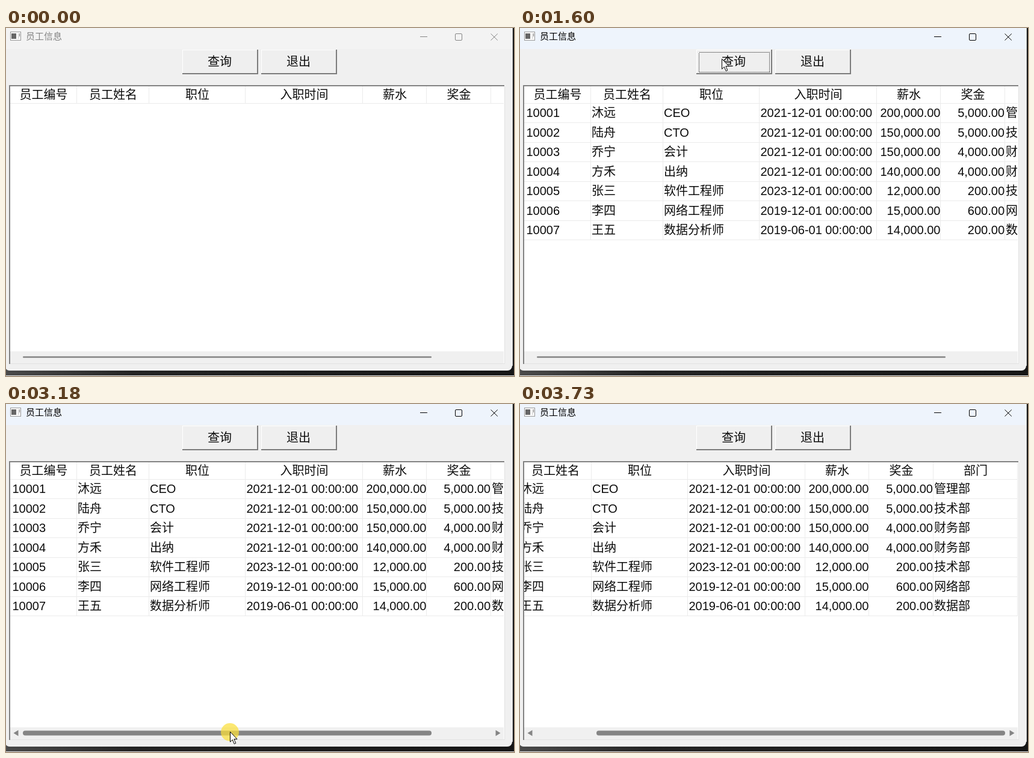
Animation, 844 px wide and 579 px high, one loop 3800 ms. Source, as an HTML page:

```html
<!DOCTYPE html>
<html lang="zh-CN">
<head>
<meta charset="utf-8">
<title>员工信息</title>
<style>
  html, body { margin: 0; width: 100%; height: 100%; overflow: hidden; background: #202020; }
  svg { display: block; width: 844px; height: 579px; }
  text { font: 300 20px "Liberation Sans", "Noto Sans CJK SC", "Noto Sans CJK", sans-serif; fill: #0c0c0c; }
  .mid { text-anchor: middle; }
  .end { text-anchor: end; }
  .caption { font-size: 15px; font-weight: 400; }
  .grid { fill: none; stroke: #ebebeb; }
  .crisp { shape-rendering: crispEdges; }
</style>
</head>
<body>
<svg viewBox="0 0 844 579">
  <defs>
    <linearGradient id="desk">
      <stop offset="0" stop-color="#4a4a4a"/>
      <stop offset=".25" stop-color="#242424"/>
      <stop offset="1" stop-color="#161616"/>
    </linearGradient>
    <clipPath id="view"><rect x="7" y="97" width="820" height="441"/></clipPath>
  </defs>

  <rect width="844" height="579" fill="url(#desk)"/>
  <rect y="578" width="844" height="1" fill="#e6e6e6"/>
  <path d="M0 0H841V562a8 8 0 0 1-8 8H6q-4 0-6-3Z" fill="#f0f0f0"/>
  <path d="M841.5 0V562" stroke="#d4d4d4"/>
  <rect id="bar" width="841" height="35"/>

  <g class="crisp">
    <rect x="7.5" y="6.5" width="17" height="14" fill="#fafafa" stroke="#9a9a9a"/>
    <rect x="9" y="9" width="8" height="9" fill="#666"/>
    <path d="M20.5 9V18" stroke="#ccc"/>
    <path d="M22.5 9V14" stroke="#777"/>
  </g>
  <text id="caption" class="caption" x="33" y="19.3">员工信息</text>
  <g id="controls" fill="none">
    <path d="M688 14.5H700M805.5 9.5 816.8 20.5M816.8 9.5 805.5 20.5"/>
    <rect x="746.5" y="9.5" width="11" height="11" rx="1.5"/>
  </g>

  <g id="buttons"></g>
  <rect id="focus" class="crisp" x="297.5" y="40.5" width="117" height="33" fill="none" stroke="#222" stroke-dasharray="1 1"/>

  <g class="crisp">
    <rect x="5" y="95" width="824" height="464" fill="#fff"/>
    <path d="M5 559V95H828V97H7V559Z" fill="#828282"/>
    <path d="M7 558.5H828.5V97" fill="none" stroke="#e2e2e2"/>
    <rect x="7" y="538" width="820" height="20" fill="#f0f0f0"/>
  </g>
  <g clip-path="url(#view)"><g id="table">
    <g id="head"></g>
    <g id="rows"></g>
  </g></g>

  <path id="arrows" d="M12.5 547.5 20.5 542.5V552.5ZM821.5 547.5 813.5 542.5V552.5Z" fill="#858585"/>
  <rect id="thumb" width="679" fill="#858585"/>

  <g id="pointer">
    <circle id="press" cy="1" r="15" fill="#fbdf3c" fill-opacity=".72"/>
    <path d="M.5.5V17.2L4.3 13.6 7.2 20.5 9.8 19.4 6.9 12.6H12Z" fill="#fff" stroke="#000"/>
  </g>
</svg>
<script>
const LOOP = 3800;
const $ = id => document.getElementById(id);
const set = (id, attrs) => { for (const k in attrs) $(id).setAttribute(k, attrs[k]); };
const show = (id, on) => set(id, { visibility: on ? 'visible' : 'hidden' });
const label = (x, y, s, cls = '') => `<text x="${x}" y="${y}" class="${cls}">${s}</text>`;

// Static parts
const button = (x, s) => `<g class="crisp">
  <rect x="${x}" y="36" width="126" height="41" fill="#7c7c7c"/>
  <rect x="${x}" y="36" width="124" height="39" fill="#fff"/>
  <rect x="${x + 1}" y="37" width="123" height="38" fill="#efefef"/></g>` + label(x + 62, 63.3, s, 'mid');
$('buttons').innerHTML = button(293, '查询') + button(424, '退出');

const edges = [7, 118, 238, 398, 593, 699, 806, 946];
const heads = ['员工编号', '员工姓名', '职位', '入职时间', '薪水', '奖金', '部门'];
const staff = [
  ['沐远', 'CEO', '2021-12', '200,000', '5,000', '管理部'],
  ['陆舟', 'CTO', '2021-12', '150,000', '5,000', '技术部'],
  ['乔宁', '会计', '2021-12', '150,000', '4,000', '财务部'],
  ['方禾', '出纳', '2021-12', '140,000', '4,000', '财务部'],
  ['张三', '软件工程师', '2023-12', '12,000', '200', '技术部'],
  ['李四', '网络工程师', '2019-12', '15,000', '600', '网络部'],
  ['王五', '数据分析师', '2019-06', '14,000', '200', '数据部']
];
const lines = (y1, y2) => edges.slice(1).map(x => `M${x - .5} ${y1}V${y2}`).join('');

$('head').innerHTML = `<path class="grid" d="M7 125.5H946${lines(97, 126)}"/>` +
  heads.map((s, i) => label((edges[i] + edges[i + 1]) / 2, 118.2, s, 'mid')).join('');

const row = ([name, job, month, pay, bonus, dept], i) => {
  const y = 148 + i * 32.5;
  return `<path class="grid" d="M7 ${Math.round(158 + i * 32.5) - .5}H946"/>` +
    label(10.5, y, 10001 + i) + label(119, y, name) + label(239, y, job) +
    label(399.5, y, month + '-01 00:00:00') + label(698.5, y, pay + '.00', 'end') +
    label(805, y, bonus + '.00', 'end') + label(807, y, dept);
};
$('rows').innerHTML = `<path class="grid" d="${lines(126, 353)}"/>` + staff.map(row).join('');

// Pointer: evenly timed poses [x, y, scrollbar width 0..1] per stretch
const glide = (n, a, b, ease) => Array.from({ length: n }, (_, i) => {
  const u = ease(i / (n - 1));
  return [a[0] + (b[0] - a[0]) * u, a[1] + (b[1] - a[1]) * u];
});
const easeOut = u => 1 - (1 - u) ** 2;
const smooth = u => u * u * (3 - 2 * u);
const runs = [
  [330, 800, [[600, 561, .1], [582, 524, .4], [520, 436, .55], [450, 342, .5],
              [387, 260, .4], [330, 176, .25], [321, 157, .15], [318, 116, .1]]],
  [870, 1210, glide(6, [321, 102], [335, 51], easeOut)],
  [1810, 2230, [[340, 54], [352, 61], [366, 71], [381, 81], [393, 88], [400, 84], [402, 76]]],
  [2370, 2840, glide(8, [401, 86], [339, 530], smooth)],
  [2910, 3050, [[346, 537], [360, 542, .5], [372, 545, 1]]],
  [3180, 3310, [[372, 545, 1], [408, 546, 1]]],
  [3380, 3730, [[607, 544, 1], [628, 549, 1], [656, 554, 1], [688, 561, 1], [716, 571, 1], [740, 600, 1]]]
];
const steps = runs.flatMap(([from, to, poses]) => poses.map(([x, y, h = 0], i) =>
  ({ at: from + (to - from) * i / (poses.length - 1), x, y, h })));

const within = (t, a, b) => t >= a && t < b;

function draw(t) {
  const p = steps.findLast(s => s.at <= t + .01) || { x: 0, y: 700, h: 0 };
  const active = t >= 1410;
  const ink = active ? '#000' : '#858585';
  set('bar', { fill: t >= 1600 ? '#eef4fc' : t >= 1540 ? '#eff4fa' : t >= 1490 ? '#f1f4f8' : '#f3f3f3' });
  set('caption', { style: `fill:${ink}` });
  set('controls', { stroke: ink });
  show('focus', within(t, 1410, 3180));
  show('rows', t >= 1540);

  // The thumb follows the drag until the track ends
  const drag = t >= 3180 ? Math.max(0, Math.min(99, p.x - 372)) : 0;
  const thick = 2.5 + 5.5 * p.h;
  set('thumb', { x: 28 + drag, y: 547.6 - thick / 2, height: thick, rx: thick / 2 });
  set('arrows', { opacity: p.h });
  set('table', { transform: `translate(${-Math.round(drag * 119 / 99)} 0)` });

  set('pointer', { transform: `translate(${Math.round(p.x)} ${Math.round(p.y)})` });
  show('press', within(t, 1410, 1490) || within(t, 3180, 3450));
}

const start = performance.now();
function tick() {
  draw((performance.now() - start) % LOOP);
  requestAnimationFrame(tick);
}
tick();
</script>
</body>
</html>
```
